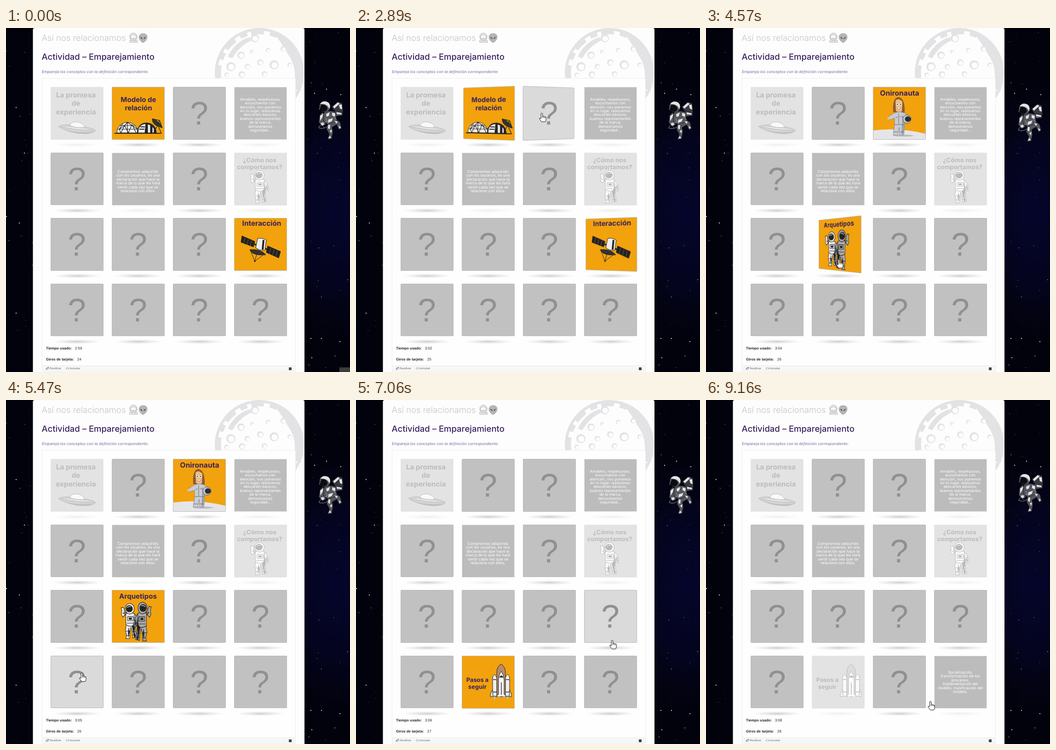
Recreate the animation shown at these times as an HTML page. Size 748 by 748 pixels, loop 9.23 s.

```html
<!DOCTYPE html>
<html lang="es">
<head>
<meta charset="utf-8">
<title>Actividad – Emparejamiento</title>
<style>
  html, body { margin: 0; width: 100%; height: 100%; overflow: hidden; background: #02020c; }
  #stage { position: relative; width: 748px; height: 748px; overflow: hidden; }
  svg { display: block; overflow: visible; }
  #page, #cursor { position: absolute; left: 0; top: 0; }
  text { font-family: Inter, sans-serif; text-rendering: geometricPrecision; }
  .ui text { font-family: "Liberation Sans", Arial, sans-serif; font-size: 7.9px; fill: #222; }
  .ui .label { font-weight: 700; }
  .ui .small { font-size: 6px; fill: #666; }
  .card { position: absolute; width: 114.5px; height: 114.5px; perspective: 400px; }
  .face { position: absolute; inset: 0; border-radius: 2px; backface-visibility: hidden; overflow: hidden; }
  .face::after { content: ""; position: absolute; inset: 0; border: 1px solid #b9b9b9; border-radius: 2px; }
  .front { background: #c1c1c1; }
  .hover .front { background: #dadada; }
  .front text { font: 71px "Liberation Sans", Arial, sans-serif; fill: #909090; }
  .orange { background: #f2a20c; }
  .purple { background: #38205f; }
  .orange .words { fill: #38205f; font-weight: 700; }
  .purple .words { fill: #fff; font-weight: 400; }
  .shadow { position: absolute; left: 5px; right: 5px; top: 121px; height: 10px;
            background: radial-gradient(closest-side, #ccc, #ddd8 55%, #fff0); }
</style>
</head>
<body>
<div id="stage">
<svg id="page" width="748" height="748">
  <defs>
    <radialGradient id="glow"><stop stop-color="#05052c"/><stop offset=".5" stop-color="#04041e"/><stop offset="1" stop-color="#02020c" stop-opacity="0"/></radialGradient>
    <clipPath id="sheet"><rect x="58" width="591" height="748" rx="4"/></clipPath>
    <g id="astro" stroke="#222" stroke-width="1" stroke-linejoin="round" fill="currentColor">
      <path d="M11 22L4 28L1 23L2 14L0 9L5 8L8 13L7 21L12 18Z"/>
      <path d="M31 21L37 29L41 40L39 46L34 44L34 38L29 31Z"/>
      <path d="M12 43L10 55L13 65L11 71L20 71L21 57L23 48L26 58L27 70L36 68L34 60L32 43Z"/>
      <path d="M11 21Q21 17 31 21L33 44Q22 49 11 43Z"/>
      <circle cx="20" cy="11" r="10.5"/>
      <ellipse cx="19" cy="11" rx="7.5" ry="6.5" fill="#222"/>
      <path d="M14 9Q18 5 23 7" fill="none" stroke="#eee"/>
      <path d="M15 27H28V35H15ZM13 40H32M11 56H21M26 57H34M12 65H20M27 64H35M4 20H8M35 34L39 33" fill="none"/>
      <path d="M29 22L33 44L31 57L34 67L30 69L28 58L25 46L30 41ZM18 48L20 58L17 70L16 58ZM35 30L39 40L37 45L35 38ZM11 22L6 27L9 21ZM18 29H25V33H18Z" fill="#222" stroke="none"/>
    </g>
  </defs>
  <rect width="748" height="748" fill="#02020c"/>
  <ellipse cx="715" cy="400" rx="150" ry="330" fill="url(#glow)"/>
  <g id="stars" fill="#fff"></g>
  <g id="drifter">
    <g stroke="#0a0a12" stroke-width=".7" stroke-linejoin="round" fill="#55555c">
      <path d="M708 171L722 160L731 163L733 184L720 189Z" fill="#38383f"/>
      <path d="M688 183L682 190L680 205L688 214L696 209L690 202L694 193Z"/>
      <path d="M715 180L731 184L732 190L717 192Z"/>
      <path d="M700 205L697 220L703 231L699 242L708 241L711 226L709 216L719 210L724 221L730 218L726 204L715 197Z"/>
      <path d="M691 184Q704 177 717 183L719 202L700 210L690 202Z"/>
      <circle cx="693" cy="171" r="12"/>
      <ellipse cx="690" cy="174" rx="8.5" ry="7" fill="#0b0b12" transform="rotate(20 690 174)"/>
    </g>
    <path d="M683 165Q690 156 701 162Q707 168 703 176Q699 164 683 165ZM711 171L721 162L726 164L714 175ZM724 167L730 166L731 177L726 175ZM683 191L690 186L688 194L683 202ZM684 207L690 205L692 210L687 212ZM696 187L704 183L702 191L697 193ZM709 184L716 186L715 193L709 190ZM701 199L711 196L708 203L700 206ZM719 183L730 185L729 188L719 187ZM701 210L705 211L704 220L700 218ZM704 223L709 221L707 229ZM701 240L704 234L707 239ZM714 202L721 203L719 208ZM723 212L728 216L725 219Z" fill="#e4e4e6"/>
    <path d="M698 203Q681 210 680 217Q690 221 699 214M684 168L681 178M712 193L719 200M695 196L699 203" fill="none" stroke="#bbb" stroke-width=".8"/>
  </g>
  <rect x="58.500" width="590.500" height="752" rx="4" fill="#fdfdfd"/>
  <g clip-path="url(#sheet)" fill="#e3e3e5">
    <circle cx="551" cy="97" r="94" fill="none" stroke="#e3e3e5" stroke-width="6"/>
    <circle cx="551" cy="97" r="88" fill="none" stroke="#e3e3e5" stroke-width="9" stroke-dasharray="28 13 16 9"/>
    <path d="M580 8Q615 18 634 52Q651 85 641 137L624 132Q636 88 613 57Q602 36 580 8Z"/>
    <g id="craters"></g>
    <path d="M482 62Q500 28 530 20L534 27Q508 38 492 66Z"/>
  </g>
  <rect x="78.5" y="109.5" width="551" height="637" fill="#fefefe" stroke="#ececec"/>
  <rect x="79" y="734" width="550" height="12" fill="#f7f7f7"/>
  <path d="M79 734.5H629" stroke="#e8e8e8"/>
  <text x="77.500" y="28" font-size="18.5" font-weight="300" fill="#c9c1c8">Así nos relacionamos</text>
  <text x="77.500" y="68.5" font-size="18.5" font-weight="500" fill="#38205f">Actividad – Emparejamiento</text>
  <text x="78" y="98" font-size="8.35" font-style="italic" fill="#7468a4">Empareja los conceptos con la definición correspondiente:</text>
  <g stroke="#999" stroke-width=".8">
    <path d="M269 31Q268 25 273 24H281Q286 25 286 31Z" fill="#eee"/>
    <circle cx="277" cy="19" r="8" fill="#eee"/>
    <rect x="271" y="15" width="12" height="9" rx="4" fill="#fff"/>
    <path d="M274 21Q277 24 280 21M272 28H275M279 28H283" fill="none"/>
    <path d="M298 12Q307 12 307 20Q306 28 298 32Q290 28 289 20Q290 12 298 12Z" fill="#b5b5b5"/>
    <path d="M292 19Q296 20 297 24Q293 24 292 19ZM304 19Q300 20 299 24Q303 24 304 19Z" fill="#555" stroke="none"/>
  </g>
  <g class="ui">
    <text class="label" x="87" y="698.5">Tiempo usado:</text><text id="clock" x="150" y="698.5"></text>
    <text class="label" x="87" y="722.5">Giros de tarjeta:</text><text id="turns" x="155" y="722.5"></text>
    <text class="small" x="95" y="742.3">Reutilizar</text><text class="small" x="138" y="742.3">Incrustar</text>
    <path d="M88 739.5Q90 736.500 92.500 739M92.500 741Q90 744 87.500 741M92.700 737V739.300H90.500M87.300 743V740.700H89.500M132.500 738L130.500 740.300L132.500 742.500M134.500 738L136.500 740.300L134.500 742.500" fill="none" stroke="#555" stroke-width=".8"/>
    <rect x="615" y="738" width="6" height="6" fill="#444"/>
  </g>
  <rect id="corner" x="725" y="738" width="23" height="10" fill="#3c3c3c"/>
</svg>
<div id="cards"></div>
<svg id="cursor" width="20" height="24" stroke="#111" stroke-linejoin="round">
  <path id="hand" d="M-1.700 1Q0 -1 1.700 1V7Q3.500 5.800 4.500 7.500Q6.300 6.600 7 8.300Q9 7.800 9.200 10V14Q9 17 7.500 19H-.5Q-3.500 15 -5.500 11.500Q-4.500 9.500 -1.700 12ZM1.700 7V10.500M4.500 8V10.500M7 9V11" fill="#fff"/>
  <path id="arrow" d="M0 0V12.500L3 10L5.200 15L7.400 14L5.200 9.200H9Z" fill="#111" stroke="#eee" stroke-width=".6"/>
</svg>
</div>
<script>
const LOOP = 9230, FLIP = 600, SIZE = 114.5;
const $ = id => document.getElementById(id);
const clamp = x => Math.min(1, Math.max(0, x));

// CSS "ease" curve, solved by bisection
function ease(x) {
  x = clamp(x);
  let lo = 0, hi = 1, s = x;
  const bez = (s, a, b) => 3 * (1 - s) ** 2 * s * a + 3 * (1 - s) * s * s * b + s ** 3;
  for (let i = 0; i < 20; i++) {
    s = (lo + hi) / 2;
    if (bez(s, .25, .25) < x) lo = s; else hi = s;
  }
  return bez(s, .1, 1);
}

// Linear interpolation through [time, x, y] points
function along(points, t) {
  const i = points.findIndex(p => p[0] > t);
  if (i === 0) return points[0].slice(1);
  if (i < 0) return points.at(-1).slice(1);
  const [a, b] = [points[i - 1], points[i]], k = (t - a[0]) / (b[0] - a[0]);
  return [1, 2].map(n => a[n] + (b[n] - a[n]) * k);
}

const words = (lines, y, size, pitch, x = 57) => lines.split('|').map((line, i) =>
  `<text class="words" x="${x}" y="${y + i * pitch}" font-size="${size}" text-anchor="middle">${line}</text>`).join('');
const ink = (d, fill = 'none', width = 1) =>
  `<path d="${d}" fill="${fill}" stroke="#222" stroke-width="${width}" stroke-linejoin="round"/>`;
const astro = (transform, color) => `<g transform="${transform}" color="${color}"><use href="#astro"/></g>`;

const ufo = ink('M17 86Q30 81 42 83L75 87Q95 91 98 95Q92 102 72 102Q36 100 17 86Z', '#777') +
  ink('M42 84Q43 76 57 76Q72 79 74 88Q56 90 42 84Z', '#eee') +
  ink('M20 87Q55 93 96 96', 'none', .8) +
  '<path d="M24 91Q50 101 92 98Q75 105 50 100Z" fill="#333"/><path d="M24 86Q50 89 88 93Q60 93 24 86Z" fill="#eee"/>';
const station = ink('M6 101H105', 'none', 2) + ink('M11 100A23 23 0 0 1 57 100Z', '#eee') +
  ink('M12 92H56M17 84H51M24 80L16 92L20 100L28 84L36 100L44 82L53 100M34 77L28 84L16 92M34 77L44 84L56 92M34 77V100', 'none', 1.2) +
  ink('M55 100Q57 78 76 78Q96 80 97 100Z', '#222') +
  ink('M58 91Q62 81 74 80L72 100H57ZM78 81L84 83V100H78ZM88 86L92 91V100H88Z', '#eee') +
  ink('M60 92H71M62 87H72', 'none', 2) +
  ink('M88 69Q87 84 110 89Q106 76 88 69Z', '#333') + ink('M89 70L104 73L109 88M104 73L99 82M98 86L91 101H108L102 88', 'none', 1.4);
const satellite = ink('M17 39L45 51L42 63L15 53ZM73 61L101 73L97 87L70 75Z', '#222') +
  '<path d="M24 43L21 55M31 46L28 58M38 49L35 61M80 65L77 78M87 68L84 81M94 71L91 84" stroke="#8d7040" stroke-width=".8"/>' +
  ink('M44 57L73 69', 'none', 3) + ink('M51 45Q59 42 70 48L67 70Q57 72 47 65Z', '#eee') +
  ink('M64 48L62 69', 'none', 4) + ink('M34 69Q40 83 69 80Q58 67 34 69Z', '#333') +
  ink('M36 72L45 94L64 80M45 94L50 76') + '<circle cx="45" cy="94" r="1.8" fill="#222"/>';
const rocket = ink('M76 87V35Q77 22 86 18Q94 24 95 35V87Z', '#b58a68') +
  ink('M67 88V48Q68 42 71 41Q74 42 76 48V88ZM95 88V48Q97 41 100 41Q103 42 104 48V88Z', '#eee') +
  ink('M80 84V51Q81 40 86 34Q91 41 92 52V84L98 89H74Z', '#f5f5f5') +
  ink('M86 58V85M68 52H75M96 52H103M68 79H76M96 79H104', 'none', 1.4) + ink('M67 74L62 84V89H68ZM104 74L108 84V89H103Z', '#ddd') +
  ink('M82 47Q86 40 90 47Z', '#222') +
  '<path d="M69 89L71 98L74 89M79 88L81 94L83 88M90 88L92 94L94 88M97 89L100 98L102 89" fill="#bbb"/>';
const dreamer = '<path d="M0 95Q55 87 114.5 102V114.5H0Z" fill="#e5e5e9"/><ellipse cx="66" cy="106" rx="22" ry="2" fill="#bbb"/>' +
  '<path d="M44 55Q42 24 55 22Q70 24 69 56Z" fill="#8f5a30"/><path d="M49 30Q55 23 64 32L63 53Q56 58 50 52Z" fill="#e9bd85"/>' +
  '<g fill="#c9ccd3" stroke="#777c88" stroke-width=".8"><path d="M46 57Q57 52 69 57L79 66L77 76L68 72L69 84L67 105H58L57 88L54 105H44L47 82V68L36 72L32 66Z"/></g>' +
  '<path d="M64 60L69 72L68 84L66 103L62 104L63 84Z" fill="#9a9ea8"/>' +
  '<circle cx="74" cy="70" r="9" fill="#c4c7ce" stroke="#555"/><ellipse cx="76" cy="70" rx="6.5" ry="6" fill="#2b2d36"/>' +
  '<g fill="#fff"><circle cx="53" cy="38" r="2.600"/><circle cx="60" cy="38" r="2.600"/></g>' +
  '<g fill="#222"><circle cx="53" cy="38" r="1.300"/><circle cx="60" cy="38" r="1.300"/></g>' +
  '<path d="M52 46Q56 51 61 46" fill="#fff" stroke="#833" stroke-width=".8"/><path d="M56 58V81M49 66H54M59 65H64M47 82H68M45 98H55M58 98H67" stroke="#666" fill="none"/>' +
  '<circle cx="34" cy="68" r="3" fill="#e9bd85"/>';

// Keyed by row and column; open/close are click times, matched is when the pair fades
const faces = {
  '00': { matched: -1000, art: words('La promesa|de|experiencia', 22.5, 15.2, 18.5, 55) + ufo },
  '01': { close: 2840, art: words('Modelo de|relación', 33, 15.1, 18.3, 58) + station },
  '02': { open: 2840, close: 6175, art: words('Onironauta', 19, 15.7, 0, 58) + dreamer },
  '03': { matched: -1000, purple: true, art: words('Amables, respetuosos,|escuchamos con|atención, nos ponemos|en tu lugar, realizamos|descartes básicos,|buenos representantes|de la marca,|demostramos|seguridad...', 29.8, 8.2, 8.4) },
  '11': { matched: -1000, purple: true, art: words('Compromiso adquirido|con los usuarios, es una|declaración que hace la|marca de lo que les hará|sentir cada vez que se|relacione con ellos.', 44, 8.3, 8.4) },
  '13': { matched: -1000, art: words('¿Cómo nos|comportamos?', 20.5, 13.3, 15, 55.5) + astro('translate(35 38)', '#eee') },
  '21': { open: 4275, close: 6175, art: words('Arquetipos', 18.5, 15.1, 0) + astro('translate(20 29) scale(.95 1.08)', '#e8e8e8') + astro('translate(86 26) scale(-.95 1.2)', '#aaa') },
  '23': { close: 2840, art: words('Interacción', 17, 15.4, 0, 60) + satellite },
  '31': { open: 6175, matched: 8350, art: words('Pasos a|seguir', 57, 12.9, 15, 34) + rocket },
  '33': { open: 7650, matched: 8350, purple: true, art: words('Socialización,|transformación de los|procesos,|Implementación del|modelo, masificación del|modelo.', 39, 8.3, 8.4) },
};

const cards = [];
for (let row = 0; row < 4; row++) for (let col = 0; col < 4; col++) {
  const face = faces['' + row + col];
  const x = 97 + col * 133.1, y = 128 + row * 142.6;
  const el = document.createElement('div');
  el.className = 'card';
  el.style.cssText = `left:${x}px;top:${y}px`;
  const svg = art => `<svg width="${SIZE}" height="${SIZE}">${art}</svg>`;
  el.innerHTML = '<div class="shadow"></div><div class="face front">' +
    svg('<text x="57" y="82" text-anchor="middle">?</text>') + '</div>' +
    (face ? `<div class="face back ${face.purple ? 'purple' : 'orange'}">${svg(face.art)}</div>` : '');
  $('cards').append(el);
  cards.push({ open: face ? -1000 : Infinity, close: Infinity, matched: Infinity, ...face,
    x, y, el, front: el.querySelector('.front'), back: el.querySelector('.back') });
}

let seed = 11;
const random = () => (seed = seed * 16807 % 2147483647) / 2147483647;
const dot = (x, y, r, o = 1) => `<circle cx="${x}" cy="${y}" r="${r}" opacity="${o}"/>`;
let stars = '';
for (let i = 0; i < 170; i++) {
  const left = random() < .37;
  stars += dot(left ? random() * 58 : 649 + random() * 99, random() * 748, .25 + random() ** 4 * .7, .2 + random() * .6);
}
for (const [x, y] of [[697, 133], [728, 145], [671, 142], [22, 173], [40, 272], [1, 410], [29, 424], [663, 675], [686, 675], [665, 717], [726, 682], [22, 620]])
  stars += dot(x, y, 1.1);
$('stars').innerHTML = stars;

$('craters').innerHTML = [[541, 22, 9], [583, 80, 10], [511, 59, 8], [553, 75, 7], [525, 84, 6], [489, 84, 10],
  [570, 48, 5], [535, 52, 4], [603, 45, 6], [480, 102, 5], [562, 100, 6], [617, 80, 5], [513, 101, 7]]
  .map(([x, y, r]) => dot(x, y, r) + `<circle cx="${x + 1}" cy="${y + 1}" r="${r * .68}" fill="#fdfdfd"/>`).join('');

const pointerPath = [[250, 775, 560], [1000, 610, 430], [2000, 440, 240], [2600, 404, 185], [2950, 404, 185],
  [3400, 395, 330], [3900, 310, 480], [4150, 289, 503], [4700, 289, 503], [5000, 200, 560], [5400, 150, 590],
  [5900, 255, 612], [6150, 272, 610], [6450, 272, 610], [7060, 557, 522], [7450, 570, 610], [7750, 570, 620],
  [8190, 582, 696], [8450, 576, 707], [8700, 555, 702], [9160, 488, 655]];
const driftPath = [[1900, 0, 0], [2890, 0, .5], [3950, -1, 3], [4570, -1, 5], [6240, 1.5, 6.5], [7060, 1, 6], [8190, 0, 5], [9160, 0, 1.5]];
const clicks = [2840, 4275, 6175, 7650];

function render(t) {
  const [px, py] = along(pointerPath, t);
  const over = (c, margin) => px > c.x - margin && px < c.x + SIZE + margin && py > c.y - margin && py < c.y + SIZE + margin;
  for (const c of cards) {
    const turn = 180 * (ease((t - c.open) / FLIP) - ease((t - c.close) / FLIP));
    c.front.style.transform = `rotateY(${turn}deg)`;
    if (c.back) c.back.style.transform = `rotateY(${turn - 180}deg)`;
    const fade = ease((t - c.matched) / 400);
    c.el.style.filter = fade ? `grayscale(${fade}) opacity(${1 - .69 * fade})` : '';
    c.el.classList.toggle('hover', over(c, 0));
  }
  const hand = cards.some(c => over(c, 10.5));
  $('hand').style.display = hand ? '' : 'none';
  $('arrow').style.display = hand ? 'none' : '';
  $('cursor').style.transform = `translate(${px}px,${py}px)`;
  $('drifter').setAttribute('transform', `translate(${along(driftPath, t)})`);
  const seconds = 179 + Math.floor((t + 600) / 1000);
  $('clock').textContent = Math.floor(seconds / 60) + ':' + String(seconds % 60).padStart(2, '0');
  $('turns').textContent = 24 + clicks.filter(click => t >= click).length;
  $('corner').style.display = t < 70 ? '' : 'none';
}

const start = performance.now();
function tick() {
  render((performance.now() - start) % LOOP);
  requestAnimationFrame(tick);
}
tick();
</script>
</body>
</html>
```
